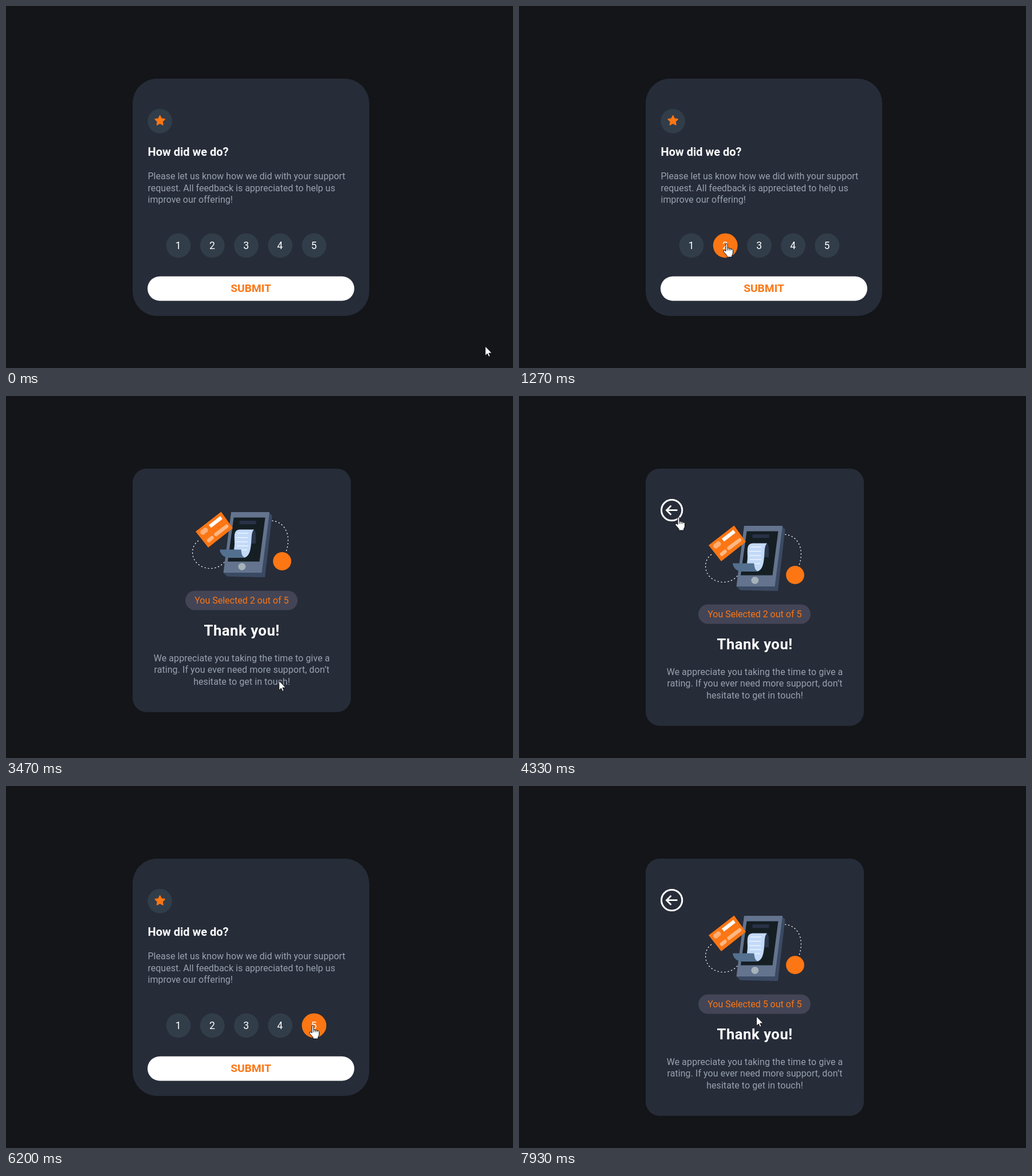
Animation of 885 by 633 pixels, one loop 8000 ms. Source, as an HTML page:

```html
<!DOCTYPE html>
<html lang="en">
<head>
<meta charset="utf-8">
<title>Rating card</title>
<style>
  html, body { margin: 0; width: 100%; height: 100%; overflow: hidden; background: #131518; }
  svg { display: block; width: 885px; height: 633px; }
  text { font-family: Roboto, Inter, sans-serif; font-size: 16px; }
  .card { fill: #262c38; }
  .round { fill: #323d4a; }
  .orange, .round.on, .submit.on rect { fill: #fc7614; }
  .white, .submit rect { fill: #fff; }
  .bold { font-weight: 700; fill: #fff; }
  .note { fill: #99a2b0; }
  .mid { text-anchor: middle; }
  .loose { letter-spacing: .07px; }
  .digit { font-size: 17.6px; fill: #fff; }
  .submit text { font-size: 19.2px; font-weight: 700; fill: #fc7614; }
  .submit.on text { fill: #fff; }
  .line { fill: none; stroke: #fff; }
  .hide { display: none; }
</style>
</head>
<body>
<svg viewBox="0 0 885 633">
  <g id="rating">
    <rect class="card" x="221" y="127" width="413" height="415" rx="43"/>
    <circle id="badge" class="round" cx="268.6" cy="201.3" r="21.4"/>
    <polygon id="star" class="orange" stroke="#fc7614" stroke-width="1.8" stroke-linejoin="round"/>
    <text class="bold" x="247.5" y="261.5" style="font-size:20px">How did we do?</text>
    <text class="note" x="247.5" y="303">Please let us know how we did with your support</text>
    <text class="note" x="247.5" y="323.5">request. All feedback is appreciated to help us</text>
    <text class="note" x="247.5" y="344">improve our offering!</text>
    <g id="scores"></g>
    <g id="submit" class="submit">
      <rect x="247" y="472.8" width="361" height="42.6" rx="21.3"/>
      <text class="mid" x="427.5" y="500.3">SUBMIT</text>
    </g>
  </g>

  <g id="thanks">
    <rect id="panel" class="card" x="221" y="127" width="381" rx="24.5"/>
    <g id="back" class="line" stroke-width="3">
      <circle cx="266.7" cy="199.7" r="18.1"/>
      <path d="M276.5 199.7H258M265.5 191.7L257.5 199.7L265.5 207.7" stroke-width="2.8"/>
    </g>
    <g id="content">
      <path class="line" stroke-width="1.2" stroke-dasharray="2.4 3.6"
        d="M336 253C324 261 322 279 332 291C346 306 372 305 383 288M464 218C486 220 499 242 489 272"/>
      <circle class="orange" cx="482" cy="289" r="15.9"/>
      <path fill="#3b4a63" d="M458 203L464.5 209L452 317L386 315.5L379.5 309L446 306Z"/>
      <path fill="#64748e" d="M393 203H460L446.5 309H379.5Z"/>
      <path fill="#151e23" d="M397.5 212.5H452.5L442.5 289.5H387Z"/>
      <rect fill="#283146" x="407.5" y="218" width="29" height="6.3"/>
      <path fill="#2a374b" d="M426 234H432C436 235 436 240 436 246V258H425Z"/>
      <path fill="#c3daf9" d="M398 268C400 256 398 250 399 242C400 236 403 234 408 233.5H433C428 238 429 247 428 257C427 271 424 283 413 283H398Z"/>
      <path class="line" stroke-width="1.2" d="M404 240H423M402 247.500H422M402 255H422M403 262H423M404 269H421"/>
      <path fill="#54708f" d="M373 268.5H410.5C410.5 276 413 282 418 283H392C380 283 374 277 373 268.5Z"/>
      <circle fill="#a6b2ba" cx="411.8" cy="298.3" r="6.4"/>
      <path class="orange" d="M331 237L375.5 202.5L396 231L353 265Z"/>
      <path class="line" stroke-width="6.5" d="M356 228L376 212.5"/>
      <g class="white" opacity=".42">
        <circle cx="343.8" cy="238" r="4.5"/>
        <circle cx="348" cy="234.8" r="4.5"/>
      </g>
      <path class="line" stroke-width="6.5" stroke-linecap="round" opacity=".48" d="M354 252.5L359.5 248M366.5 242L385 228"/>
      <rect fill="#434556" x="313" y="340.5" width="196" height="34" rx="17"/>
      <text id="result" class="orange mid" x="411.3" y="363"></text>
      <text class="bold mid" x="411.7" y="418.5" style="font-size:25.6px;letter-spacing:.55px">Thank you!</text>
      <text class="note mid loose" x="411.5" y="463.5">We appreciate you taking the time to give a</text>
      <text class="note mid loose" x="411.5" y="484">rating. If you ever need more support, don’t</text>
      <text class="note mid loose" x="411.5" y="504.5">hesitate to get in touch!</text>
    </g>
  </g>

  <g id="cursor">
    <path id="arrow" fill="#fff" stroke="#0b0c0e" stroke-width=".9" d="M.6 0V16.5L4.3 13L6.6 18.3L9.1 17.2L6.8 12H12.2Z"/>
    <g id="hand" transform="translate(-6 0)" stroke="#0b0c0e">
      <path fill="#fff" d="M5 2Q5 .5 6.5 .5Q8 .5 8 2V8.5Q9.5 7.3 11 9Q12.7 8.2 14 9.8Q16 9.3 17.5 11.5V17Q17.3 19 15.8 21V24H7V21.5L1 14.5Q.3 12.5 2 12Q3.5 12 5 14Z"/>
      <path fill="none" d="M8 8.5V12.5M11 9V12.5M14 9.8V12.5"/>
    </g>
    <path id="beam" class="line" stroke-width="1.2" d="M-4 -8.5H4M0 -8.5V8.5M-4 8.5H4"/>
  </g>
</svg>
<script>
const LOOP = 8000, TICKS = 120;   // the picture advances 15 times a second
const $ = id => document.getElementById(id);
const show = (id, on) => $(id).classList.toggle("hide", !on);
const light = (el, on) => el.classList.toggle("on", on);

// moments, in ticks
const PICK_TWO = 19, THANKS = 52, RETURN = 79, PICK_FIVE = 94, THANKS_AGAIN = 112;

const home = { x: 836, y: 595 };
const glides = [
  { from: 0, to: 15, x: 362, y: 415, sag: 16 },
  { from: 24, to: 28, x: 476, y: 498 },
  { from: 58, to: 68, x: 270, y: 199 },
  { from: 81, to: 82, x: 265, y: 205 },
  { from: 85, to: 93, x: 535, y: 418 },
  { from: 98, to: 101, x: 504, y: 507 },
  { from: 102, to: 105, x: 503, y: 488 },
  { from: 115, to: 119, x: 414, y: 403 }
];
const ease = f => 1 - (1 - f) ** 2.7;

function pointer(tick) {
  let { x, y } = home;
  for (const g of glides) {
    const f = ease(Math.min(1, Math.max(0, (tick - g.from) / (g.to - g.from))));
    x += (g.x - x) * f;
    y += (g.y - y) * f + 4 * (g.sag || 0) * f * (1 - f);
  }
  return { x: Math.round(x), y: Math.round(y) };
}

const scoreX = n => 301 + 59.2 * (n - 1);
const near = (p, x, y, r) => Math.hypot(p.x - x, p.y - y) < r;
const inside = (p, x0, y0, x1, y1) => p.x > x0 && p.x < x1 && p.y > y0 && p.y < y1;

$("star").setAttribute("points", Array.from({ length: 10 }, (_, i) => {
  const a = Math.PI * (i / 5 - .5), r = i % 2 ? 4.3 : 8.7;
  return `${268.7 + r * Math.cos(a)},${200.7 + r * Math.sin(a)}`;
}).join(" "));

$("scores").innerHTML = [1, 2, 3, 4, 5].map(n =>
  `<circle class="round" cx="${scoreX(n)}" cy="418.8" r="21.4"/>` +
  `<text class="digit mid" x="${scoreX(n) - .3}" y="425">${n}</text>`).join("");
const scores = [...$("scores").querySelectorAll("circle")];

function drawRating(tick, p) {
  const fresh = tick === RETURN;   // hover is noticed one tick after the page appears
  const picked = tick >= PICK_FIVE ? 5 : tick >= PICK_TWO && tick < RETURN ? 2 : 0;
  const overSubmit = inside(p, 247, 473, 608, 515.5);
  let overScore = false;
  scores.forEach((el, i) => {
    const over = near(p, scoreX(i + 1), 418.8, 21.4);
    overScore ||= over;
    light(el, over || picked === i + 1);
  });
  light($("submit"), overSubmit);
  light($("badge"), !fresh && near(p, 268.6, 201.3, 21.4));
  const overText = inside(p, 247, 245, 390, 267) || inside(p, 247, 288, 592, 349);
  return fresh || overSubmit || overScore ? "hand" : overText ? "beam" : "arrow";
}

function drawThanks(tick, p) {
  const ready = tick !== THANKS && tick !== THANKS_AGAIN;   // back icon arrives one tick late
  const drop = ready ? 24 : 0;
  show("back", ready);
  $("panel").setAttribute("height", 425.7 + drop);
  $("content").setAttribute("transform", `translate(0 ${drop})`);
  $("result").textContent = `You Selected ${tick < RETURN ? 2 : 5} out of 5`;
  if (!ready) return "arrow";
  if (near(p, 266.7, 199.7, 20)) return "hand";
  const overText = inside(p, 257, 472, 566, 533) || inside(p, 346, 420, 477, 450) ||
    inside(p, 329, 372, 494, 391);
  return overText ? "beam" : "arrow";
}

function draw(ms) {
  const tick = Math.floor((ms + 5) * 3 / 200) % TICKS;
  const p = pointer(tick);
  const done = tick >= THANKS && tick < RETURN || tick >= THANKS_AGAIN;
  show("rating", !done);
  show("thanks", done);
  const kind = (done ? drawThanks : drawRating)(tick, p);
  for (const id of ["arrow", "hand", "beam"]) show(id, id === kind);
  $("cursor").setAttribute("transform", `translate(${p.x} ${p.y})`);
}

const start = performance.now();
function loop() {
  draw((performance.now() - start) % LOOP);
  requestAnimationFrame(loop);
}
loop();
</script>
</body>
</html>
```
